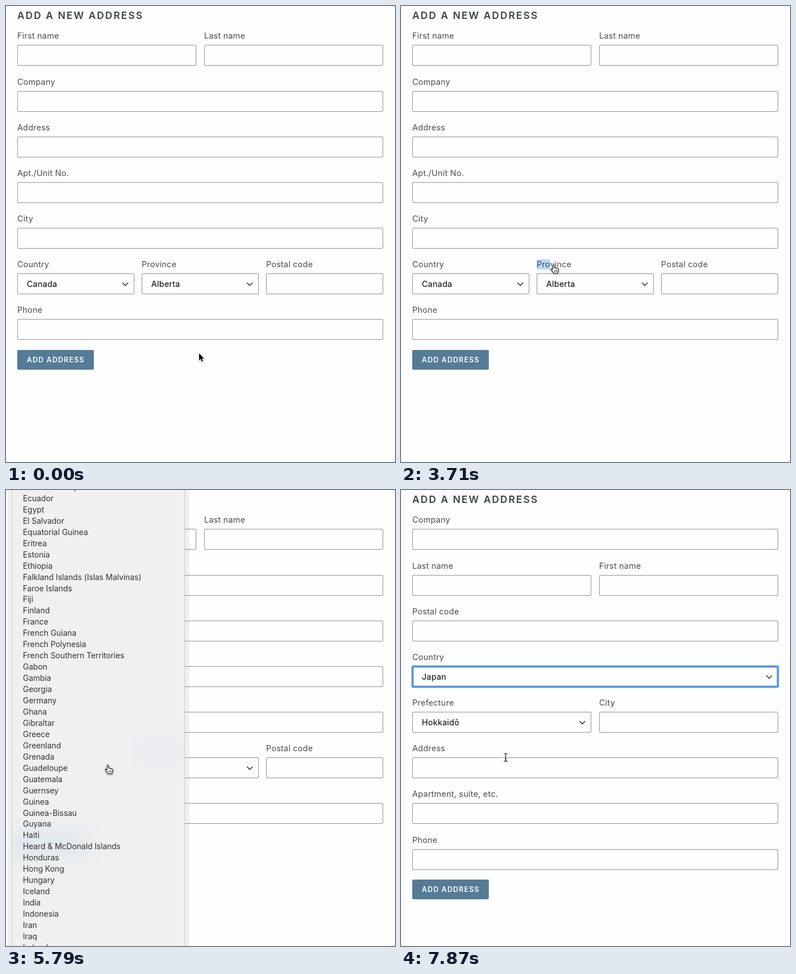
An HTML page with a canvas for the animation above (8000 ms loop, 691x810 px).

```html
<!DOCTYPE html>
<html lang="en">
<head>
<meta charset="utf-8">
<title>Address form</title>
<style>
html, body { margin: 0; width: 100%; height: 100%; overflow: hidden; background: #fefefe; }
canvas { display: block; }
</style>
</head>
<body>
<canvas id="stage" width="691" height="810"></canvas>
<script>
const ctx = document.getElementById('stage').getContext('2d');
const LOOP = 8000, STEP = 148.3;
const FAMILY = 'Inter, "Open Sans", sans-serif';
const INK = '#474b4f';
const TOPS = [69, 151, 232, 313, 394, 475, 556, 638];

// Each row lists its fields; "Label:Value" is a select.
const makeForm = (rows, buttonTop) => ({
  buttonTop,
  fields: rows.flatMap((row, r) => row.map((spec, i) => {
    const [label, value] = spec.split(':');
    const w = (650 - 13 * (row.length - 1)) / row.length;
    return { label, value, x: Math.round(20 + i * (w + 13)), y: TOPS[r], w: Math.floor(w) };
  }))
});
const canadaForm = makeForm([
  ['First name', 'Last name'], ['Company'], ['Address'], ['Apt./Unit No.'], ['City'],
  ['Country:Canada', 'Province:Alberta', 'Postal code'], ['Phone']
], 611);
const japanForm = makeForm([
  ['Company'], ['Last name', 'First name'], ['Postal code'], ['Country:Japan'],
  ['Prefecture:Hokkaidō', 'City'], ['Address'], ['Apartment, suite, etc.'], ['Phone']
], 692);

const countries = ('Austria,Azerbaijan,Bahamas,Bahrain,Bangladesh,Barbados,Belarus,Belgium,Belize,Benin,' +
  'Bermuda,Bhutan,Bolivia,Bosnia & Herzegovina,Botswana,Bouvet Island,Brazil,' +
  'British Indian Ocean Territory,British Virgin Islands,Brunei,Bulgaria,Burkina Faso,Burundi,' +
  'Cambodia,Cameroon,Canada,Cape Verde,Caribbean Netherlands,Cayman Islands,' +
  'Central African Republic,Chad,Chile,China,Christmas Island,Cocos (Keeling) Islands,Colombia,' +
  'Comoros,Congo - Brazzaville,Congo - Kinshasa,Cook Islands,Costa Rica,Croatia,Cuba,Curaçao,' +
  'Cyprus,Czech Republic,Côte d’Ivoire,Denmark,Djibouti,Dominica,Dominican Republic,Ecuador,Egypt,' +
  'El Salvador,Equatorial Guinea,Eritrea,Estonia,Ethiopia,Falkland Islands (Islas Malvinas),' +
  'Faroe Islands,Fiji,Finland,France,French Guiana,French Polynesia,French Southern Territories,' +
  'Gabon,Gambia,Georgia,Germany,Ghana,Gibraltar,Greece,Greenland,Grenada,Guadeloupe,Guatemala,' +
  'Guernsey,Guinea,Guinea-Bissau,Guyana,Haiti,Heard & McDonald Islands,Honduras,Hong Kong,Hungary,' +
  'Iceland,India,Indonesia,Iran,Iraq,Ireland,Isle of Man,Israel').split(',');

// Pointer hot spot: [step, x, y]
const path = [
  [0, 343, 617], [7, 20, 305], [8, 20, 305], [10, 42, 303], [12, 78, 303], [14, 98, 305],
  [16, 106, 305], [23, 243, 459], [24, 255, 460], [25, 271, 460], [27, 300, 461],
  [28, 300, 461], [32, 181, 489], [49, 181, 489], [50, 183, 489], [52, 183, 489], [53, 186, 475]
];
const shapes = {
  arrow: new Path2D('M0 0V12.5L2.8 9.8 4.8 14.4 7 13.4 5 9H8.8Z'),
  hand: new Path2D('M-1.5 8V1a1.4 1.4 0 0 1 2.8 0v4q2.4-.9 2.7.7 2.3-.6 2.5.9 2.4-.2 2.4 1.6' +
    'c0 3-1.2 3.8-1.4 6.6h-7.5c-.3-2-3.5-4.5-4.5-6.5-.6-1.4 1-2 2-1z'),
  knuckles: new Path2D('M1.8 9v3.5M3.8 9v3.5M5.8 9v3.5'),
  text: new Path2D('M-3.5-7q3 0 3.5 1.5.5-1.5 3.5-1.5M0-5.500V5.500M-3.5 7q3 0 3.5-1.5.5 1.5 3.5 1.5M-1.500 2h3')
};

function setFont(size, spacing, weight = 400) {
  ctx.font = `${weight} ${size}px ${FAMILY}`;
  ctx.letterSpacing = spacing + 'px';
}

function write(text, x, y, color) {
  ctx.fillStyle = color;
  ctx.fillText(text, x, y);
}

function stroke(shape, color, width) {
  ctx.strokeStyle = color;
  ctx.lineWidth = width;
  ctx.stroke(shape);
}

function box(x, y, w, h, r) {
  const p = new Path2D();
  p.roundRect(x, y, w, h, r);
  return p;
}

function drawField(f, selected, focused) {
  setFont(14.5, 0.25);
  if (selected) {
    ctx.fillStyle = '#b3d7ff';
    ctx.fillRect(f.x, f.y - 25, ctx.measureText(f.label.slice(0, selected)).width, 18);
  }
  write(f.label, f.x, f.y - 11, INK);
  const frame = box(f.x + 0.5, f.y + 0.5, f.w - 1, 36, 1.5);
  if (focused) {
    stroke(frame, 'rgba(70,140,230,.45)', 5);
    stroke(frame, '#2f7fe0', 2);
  } else {
    stroke(frame, '#919191', 1);
  }
  if (f.value) {
    write(f.value, f.x + 17, f.y + 24, '#000');
    stroke(new Path2D(`M${f.x + f.w - 21} ${f.y + 16.5}l5 5 5-5`), '#222', 1.4);
  }
}

function drawForm(form, selection, focused) {
  setFont(17.5, 2.1, 600);
  write('ADD A NEW ADDRESS', 20, 23, '#3d4246');
  for (const f of form.fields) {
    drawField(f, selection[f.label], focused && f.label === 'Country');
  }
  ctx.fillStyle = '#557b97';
  ctx.fill(box(20, form.buttonTop, 136, 35, 2));
  setFont(12.5, 1.2, 600);
  write('ADD ADDRESS', 37, form.buttonTop + 22, '#fff');
}

function drawMenu(anchor, highlighted) {
  ctx.fillStyle = 'rgba(0,0,0,.055)';
  ctx.fillRect(3, 0, 323, 810);
  ctx.fillStyle = '#c9c9c9';
  ctx.fillRect(10, 0, 308, 810);
  ctx.fillStyle = '#f0f0f0';
  ctx.fillRect(11, 0, 306, 810);

  // Blurred page showing through
  ctx.save();
  ctx.beginPath();
  ctx.rect(11, 0, 306, 810);
  ctx.clip();
  ctx.filter = 'blur(14px)';
  ctx.fillStyle = '#e0e8ee';
  ctx.fillRect(0, 606, 145, 48);
  ctx.fillStyle = '#ebedf1';
  ctx.fillRect(225, 440, 95, 55);
  ctx.restore();

  setFont(14, -0.05);
  const center = countries.indexOf(anchor);
  countries.forEach((name, i) => {
    const y = 493.7 + (i - center) * 19.95;
    if (y < -20 || y > 830) return;
    const active = name === highlighted;
    if (active) {
      ctx.fillStyle = '#3b87f7';
      ctx.fillRect(11, y - 10, 306, 20);
      stroke(new Path2D(`M16 ${y}l3 4 6-9`), '#fff', 1.6);
    }
    write(name, 30, y + 5, active ? '#fff' : '#333');
  });
}

function pointer(k) {
  const i = Math.max(1, path.findIndex(p => p[0] >= k));
  const [k0, x0, y0] = path[i - 1], [k1, x1, y1] = path[i];
  let u = (k - k0) / (k1 - k0);
  if (k1 - k0 > 3) u = u * u * (3 - 2 * u);
  return [x0 + (x1 - x0) * u, y0 + (y1 - y0) * u];
}

function pointerKind(form, x, y) {
  setFont(14.5, 0.25);
  for (const f of form.fields) {
    if (x >= f.x && x <= f.x + f.w && y >= f.y && y <= f.y + 37) return f.value ? 'arrow' : 'text';
    const labelWidth = ctx.measureText(f.label).width;
    if (x >= f.x && x <= f.x + labelWidth && y >= f.y - 27 && y < f.y - 5) return 'hand';
  }
  return 'arrow';
}

function drawPointer(kind, x, y) {
  const shape = shapes[kind];
  ctx.save();
  ctx.translate(x, y);
  ctx.lineJoin = 'round';
  if (kind === 'text') {
    stroke(shape, '#fff', 3);
    stroke(shape, '#111', 1.2);
  } else {
    ctx.shadowColor = 'rgba(0,0,0,.35)';
    ctx.shadowBlur = 3;
    ctx.shadowOffsetY = 1;
    stroke(shape, '#fff', kind === 'arrow' ? 2 : 3);
    ctx.shadowColor = 'transparent';
    ctx.fillStyle = kind === 'arrow' ? '#000' : '#fff';
    ctx.fill(shape);
    if (kind === 'hand') {
      stroke(shape, '#111', 1.2);
      stroke(shapes.knuckles, '#111', 0.8);
    }
  }
  ctx.restore();
}

// Number of characters swept so far
function sweep(k, from, mid, midCount, to, total) {
  const n = k < mid ? midCount * (k - from) / (mid - from)
    : midCount + (total - midCount) * (k - mid) / (to - mid);
  return Math.round(Math.max(0, Math.min(total, n)));
}

function draw(t) {
  const k = Math.min(53, Math.floor((t + 8) / STEP));
  const form = k < 50 ? canadaForm : japanForm;
  const selection = {};
  if (k < 23) selection['Apt./Unit No.'] = sweep(k, 8, 12, 6, 15, 13);
  else if (k < 50) selection.Province = sweep(k, 23, 25, 3, 27, 8);

  ctx.fillStyle = '#fefefe';
  ctx.fillRect(0, 0, 691, 810);
  if (k >= 50) {
    ctx.fillStyle = '#fafafa';
    ctx.fillRect(0, 0, 8, 810);
  }
  drawForm(form, selection, k >= 34);

  const menuOpen = k >= 34 && k < 50;
  if (menuOpen) {
    const anchor = k < 39 ? 'Canada' : ['Guadeloupe', 'Guatemala', 'Guernsey'][Math.min(2, k - 39)];
    ctx.save();
    if (k === 49) {
      // Composite the fading menu as one layer
      const page = ctx.getImageData(0, 0, 691, 810);
      drawMenu(anchor);
      const menu = document.createElement('canvas');
      menu.width = 691;
      menu.height = 810;
      menu.getContext('2d').drawImage(ctx.canvas, 0, 0);
      ctx.putImageData(page, 0, 0);
      ctx.globalAlpha = 0.28;
      ctx.drawImage(menu, 0, 0, 326, 810, 0, 0, 326, 810);
    } else {
      drawMenu(anchor, k < 39 ? 'Canada' : '');
    }
    ctx.restore();
  }

  const [x, y] = pointer(k);
  drawPointer(menuOpen ? 'hand' : pointerKind(form, x, y), x, y);
}

function tick() {
  draw(performance.now() % LOOP);
  requestAnimationFrame(tick);
}
tick();
</script>
</body>
</html>
```
